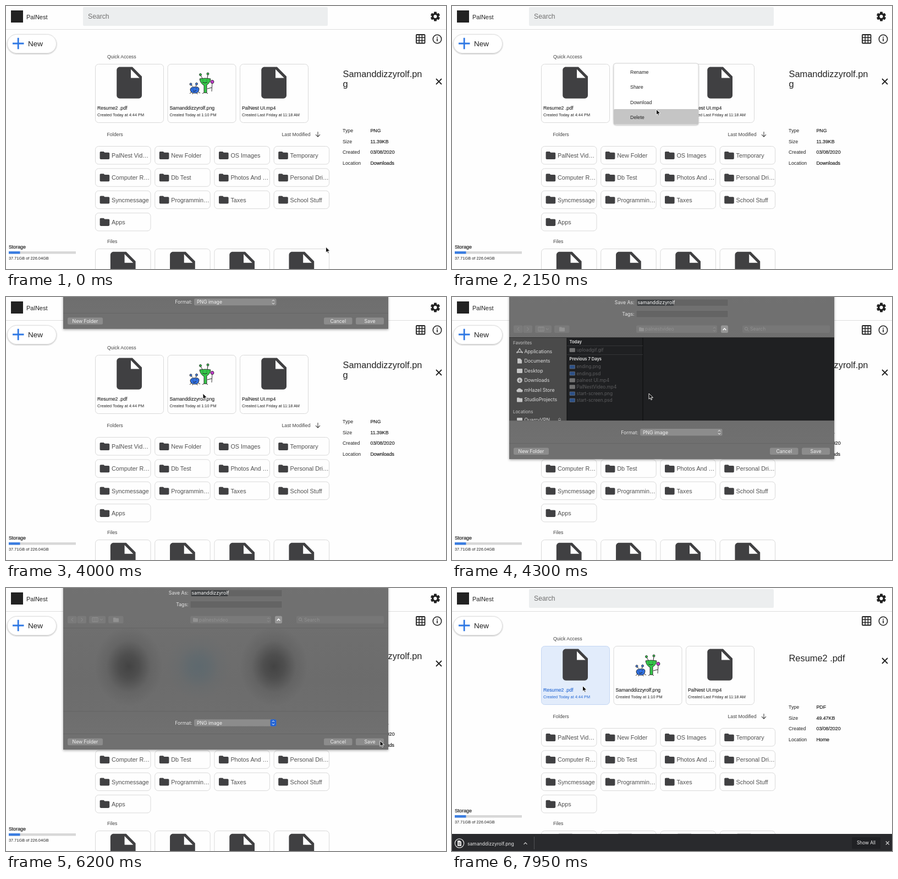
Recreate the animation shown at these times as an HTML page. Size 800 px wide and 477 px high, loop 8000 ms.

```html
<!DOCTYPE html>
<html lang="en">
<head>
<meta charset="utf-8">
<title>File drive</title>
<style>
html, body { margin: 0; width: 100%; height: 100%; overflow: hidden; background: #fefefe; }
svg { display: block; width: 800px; height: 477px; font-family: "Liberation Sans", Arial, sans-serif; }
text { white-space: pre; }
.mac { font-family: Inter, sans-serif; }
</style>
</head>
<body>
<svg id="stage" viewBox="0 0 800 477"></svg>
<script>
const LOOP = 8000;
const DOC = 'M6 2c-1.1 0-2 .9-2 2v16c0 1.1.9 2 2 2h12c1.1 0 2-.9 2-2V8l-6-6z';
const FOLDER = 'M10 4H4c-1.1 0-2 .9-2 2v12c0 1.1.9 2 2 2h16c1.1 0 2-.9 2-2V8c0-1.1-.9-2-2-2h-8z';

// y is the middle of the capitals; a null fill is inherited
const text = (x, y, s, size, fill = '#222', extra = '') =>
  `<text x="${x}" y="${y + size * .36}" font-size="${size}" ${fill ? `fill="${fill}"` : ''} ${extra}>${s}</text>`;
const rect = (x, y, w, h, fill, rx = 0, extra = '') =>
  `<rect x="${x}" y="${y}" width="${w}" height="${h}" rx="${rx}" fill="${fill}" ${extra}/>`;
const line = (d, color, width = 1, extra = '') =>
  `<path d="${d}" fill="none" stroke="${color}" stroke-width="${width}" ${extra}/>`;
const shape = (d, fill, extra = '') => `<path d="${d}" fill="${fill}" ${extra}/>`;
const circle = (x, y, r, fill, extra = '') => `<circle cx="${x}" cy="${y}" r="${r}" fill="${fill}" ${extra}/>`;
const group = (id, body, extra = '') => `<g id="${id}" ${extra}>${body}</g>`;
const at = (x, y, scale, body) => `<g transform="translate(${x} ${y}) scale(${scale})">${body}</g>`;
const medium = 'stroke="#222" stroke-width=".22"';

const outline = 'stroke="#d9d9d9"';
const docIcon = (x, y) => at(x - 11.4, y - 5.7, 2.86,
  shape(DOC, '#404042') + shape('M13 3.5V9h5.5z', '#fefefe'));
const folderIcon = (x, y, color = '#404042', scale = .88) => at(x - 2 * scale, y - 4 * scale, scale, shape(FOLDER, color));

function gear(x, y) {
  const teeth = Array.from({ length: 6 }, (_, i) =>
    `<rect x="-2.5" y="-8.6" width="5" height="6" rx=".8" transform="rotate(${i * 60})"/>`).join('');
  return at(x, y, 1, `<g fill="#222">${teeth}</g>` + circle(0, 0, 4.7, 'none', 'stroke="#222" stroke-width="3.4"') + circle(0, 0, 3, '#fefefe'));
}

function header() {
  return rect(9, 8, 22, 22, '#222') + text(37, 20, 'PalNest', 11, '#222') +
    rect(140, 2, 445, 34, '#eceeef', 2) + text(149, 19, 'Search', 12.2, '#707070') +
    gear(780.5, 19) + line('M0 42.5H800', '#dedede') +
    rect(2.5, 51.5, 89, 34, '#fff', 17, 'stroke="#dcdcdc" filter="url(#soft)"') +
    line('M12 68H32.5M22.2 57.8V78.2', '#2f78e4', 2.8) + text(40, 68, 'New', 13.5) +
    rect(746, 52, 15.5, 15.5, 'none', 1, 'stroke="#222" stroke-width="1.8"') +
    line('M751.2 52v15.5M756.4 52v15.5M746 57.2h15.5M746 62.4h15.5', '#222', 1.5) +
    circle(784, 60, 7.7, 'none', 'stroke="#222" stroke-width="1.6"') +
    line('M784 58.7V64M784 55.8V57.4', '#222', 1.7);
}

function doodle() {
  const ink = 'stroke="#222" stroke-width=".9" stroke-linejoin="round"';
  return line('M337 156l-3 3M340 158l-1 2M347 158l1 2M350 156l3 2M339 146l-2-3M345 146l1-3', '#222') +
    shape('M335 151q2-5 9-4 7-1 7 4-1 8-8 7-8 0-8-7z', '#2f6fe0', ink) +
    circle(336, 141.8, 2, '#4b86ee', ink) + circle(346.5, 141.3, 2, '#4b86ee', ink) +
    line('M340 150v1M346 149v1M340 154q3 2 6-1', '#222') +
    line('M357 131l-3-5M366 131l1-6M366 150l8-2M360 157l-3 2M364 157l3 2', '#222') +
    shape('M352 132q10-2 20 0-1 8-7 11l0 14q-3 1-5 0l0-13q-7-4-8-12z', '#35c64a', ink) +
    circle(353.5, 124.5, 2, '#35c64a', ink) + circle(367, 123, 2, '#35c64a', ink) +
    line('M358 134v1M365 134v1M357 138q5 3 9 0', '#222') +
    line('M375 138l-1 17', '#222', .9) + circle(375, 137.5, 3, '#c63bd0', ink);
}

function quickCard(i, name, date) {
  const x = 162.5 + i * 131.5;
  return rect(x, 105.5, 124, 106, '#fefefe', 6, i ? outline : `${outline} id="pick"`) +
    (i === 1 ? doodle() : docIcon(x + 38.7, 110.5)) +
    `<g ${i ? '' : 'id="pickText"'} fill="#222">` +
    text(x + 3.5, 184.5, name, 8.75, null, 'stroke="currentColor" stroke-width=".1"') +
    text(x + 3.5, 197.5, date, 7.33, null) + '</g>';
}

function content() {
  const names = ['PalNest Vid…', 'New Folder', 'OS Images', 'Temporary', 'Computer R…', 'Db Test', 'Photos And …',
    'Personal Dri…', 'Syncmessage', 'Programmin…', 'Taxes', 'School Stuff', 'Apps'];
  const column = c => 162.5 + c * 108.2;
  const folders = names.map((name, i) => {
    const x = column(i % 4), y = 254.5 + (i >> 2) * 40.3;
    return rect(x, y, 100.5, 32.5, '#fefefe', 6, outline) + folderIcon(x + 8.1, y + 9.4) + text(x + 29.5, y + 16.8, name, 10.8, '#505050');
  }).join('');
  const files = [0, 1, 2, 3].map(c =>
    rect(column(c), 440.5, 100.5, 106, '#fefefe', 6, outline) + docIcon(column(c) + 27.3, 445.8)).join('');
  return text(184, 92, 'Quick Access', 8.75, '#444') +
    quickCard(0, 'Resume2 .pdf', 'Created Today at 4:44 PM') +
    quickCard(1, 'Samanddizzyrolf.png', 'Created Today at 1:10 PM') +
    quickCard(2, 'PalNest UI.mp4', 'Created Last Friday at 11:18 AM') +
    text(183.5, 233, 'Folders', 8.75, '#444') + text(501.5, 233, 'Last Modified', 8.75, '#444') +
    line('M567 228v9M563 233.2l4 4 4-4', '#444', 1.1) + folders +
    text(184, 427, 'Files', 8.75, '#444') + files;
}

function details(title, values) {
  return title.map((s, i) => text(612.5, 132 + (i - (title.length - 1) / 2) * 18, s, 16.4)).join('') +
    `<g class="rows">${values.map((v, i) => text(662.5, 226.3 + i * 19.5, v, 8.8, '#222', medium)).join('')}</g>`;
}

function panel() {
  const labels = ['Type', 'Size', 'Created', 'Location'];
  return group('panel',
    group('infoImage', details(['Samanddizzyrolf.pn', 'g'], ['PNG', '11.39KB', '03/08/2020', 'Downloads'])) +
    group('infoPdf', details(['Resume2 .pdf'], ['PDF', '49.47KB', '03/08/2020', 'Home'])) +
    line('M782 132l10 10M792 132l-10 10', '#222', 1.8) +
    `<g class="rows">${labels.map((s, i) => text(612, 226.3 + i * 19.5, s, 8.8)).join('')}</g>`);
}

function storage() {
  return group('storage', text(5, 436.5, 'Storage', 8.8, '#222', medium) +
    rect(5, 445, 122, 4.5, '#d8d8d8') + rect(5, 445, 20.5, 4.5, '#3b7de0') +
    text(5, 457.5, '37.71GB of 226.04GB', 7.4));
}

const ROW = 27.5, MENU_TOP = 105;
function menu() {
  return group('menu', rect(294, 104, 154, 111, '#fff', 4, 'stroke="#d4d4d4" filter="url(#soft)"') +
    rect(294, 0, 154, ROW, '#c5c5c5', 2, 'id="hover"') +
    ['Rename', 'Share', 'Download', 'Delete'].map((s, i) => text(324, 119.5 + i * ROW, s, 8.9)).join(''));
}

function button(x, w, label) {
  return rect(x, 273.5, w, 12.5, '#8c8c8c', 2.5) + text(x + w / 2, 280, label, 8.7, '#f2f2f2', 'text-anchor="middle"');
}

function browser() {
  const places = ['Applications', 'Documents', 'Desktop', 'Downloads', 'mHazel Store', 'StudioProjects'];
  const icons = [
    line('M118 102l5-8.5 5 8.5M117 100h12', '#c4c4c4', 1.3),
    shape('M119 94h5l3 3v6h-8z', '#c4c4c4'),
    rect(118, 95, 10, 8, '#c4c4c4', 1),
    circle(123, 98.5, 4.8, '#c4c4c4') + line('M123 96v4.5M121 98.8l2 2 2-2', '#4b4b4b'),
    shape('M119 102.5a2.7 2.7 0 0 1 0-5 4 4 0 0 1 7 0 2.6 2.6 0 0 1 1 5z', '#c4c4c4'),
    folderIcon(118, 95, '#c4c4c4', .5)];
  const files = ['ending.png', 'ending.psd', 'palnest UI.mp4', 'PalNestVideo.mp4', 'start-screen.png', 'start-screen.psd'];
  const fileRow = (s, y, color) => rect(214, y - 3, 9.5, 6.5, color, .5, 'stroke="#8a8a8a" stroke-width=".5"') + text(226.5, y, s, 8.3, '#5d5d5f');
  const bold = 'font-weight="600"';
  return group('browser', rect(104, 73, 591, 151, '#1f2022') + rect(104, 73, 105, 151, '#4a4a4a') +
    line('M209 73v151M347 73v151', '#0c0c0d') + line('M104 73.5H695', '#333') +
    text(111, 83.5, 'Favorites', 7.8, '#b5b5b5', 'font-weight="500"') +
    places.map((s, i) => at(0, i * 17.5, 1, icons[i] + text(131.5, 98.5, s, 8.7, '#dedede'))).join('') +
    text(111, 208, 'Locations', 7.8, '#b5b5b5', 'font-weight="500"') +
    rect(118, 219, 10, 5, '#c4c4c4', 1) +
    `<g clip-path="url(#listClip)">${text(131.5, 222.5, 'QuarryVPN', 8.7, '#dedede')}</g>` +
    line('M193 222l2.5-2.5 2.5 2.5M193 223.5h5', '#aaa') +
    text(213.5, 81, 'Today', 7.6, '#e4e4e4', bold) + line('M209 88.5H347M209 104.5H347', '#343537') +
    fileRow('uploadgif.gif', 96, '#707070') + text(213.5, 112.5, 'Previous 7 Days', 7.6, '#e4e4e4', bold) +
    files.map((s, i) => fileRow(s, 126.5 + i * 12.1, /mp4$/.test(s) ? '#707070' : '#2d5187')).join(''));
}

function dialog() {
  const label = (x, y, s) => text(x, y, s, 8.7, '#e6e6e6', 'text-anchor="end"');
  const dim = '#929292';
  const tool = (x, w) => rect(x, 51.5, w, 13.5, '#7a7a7a', 2.5);
  const field = y => rect(335, y, 167, 12.5, '#646464', 0, 'stroke="#787878" stroke-width=".6"');
  const shade = (x, rx, ry, fill) => `<ellipse cx="${x}" cy="143" rx="${rx}" ry="${ry}" fill="url(#${fill})"/>`;
  return group('dialog', rect(104, -20, 591, 314, 'url(#sheet)', 0, 'filter="url(#drop)"') +
    shade(223, 62, 72, 'blurDark') + shade(487, 62, 72, 'blurDark') + shade(350, 58, 60, 'blurTint') +
    line('M104 73.5H695M104 224.5H695M104 265.5H695', '#656565') +
    label(331.5, 10, 'Save As:') + field(4) +
    rect(337, 4.8, 66, 11, '#3e4042') + text(337.5, 10, 'samanddizzyrolf', 8.7, '#fff') +
    label(331.5, 30.5, 'Tags:') + field(24.5) +
    tool(112, 16.5) + tool(129.5, 16.5) + tool(151, 30) + tool(186, 27.5) + tool(335, 147) +
    line('M122 55l-3 3.2 3 3.2M136.5 55l3 3.2-3 3.2M171 57l2.3 2.3 2.3-2.3', dim) +
    line('M157 54.5h10v7.5h-10zM160.3 54.5v7.5M163.7 54.5v7.5', dim) + folderIcon(195, 54.5, dim, .5) +
    folderIcon(340, 55, dim, .45) + text(351, 58.3, 'palnestvideo', 8.7, dim) +
    line('M475 57l2.2-2.2 2.2 2.2M475 60l2.2 2.2 2.2-2.2', dim) +
    rect(489, 51.5, 13, 13.5, '#969696', 2.5) + line('M492.7 60l2.8-3 2.8 3', '#fff', 1.5) +
    rect(528, 51.5, 159, 13.5, '#777', 2.5) + circle(535, 57.5, 2.6, 'none', `stroke="${dim}"`) +
    line('M537 59.5l2.3 2.3', dim) + text(542, 58.3, 'Search', 8.5, dim) +
    browser() +
    label(338.5, 245.5, 'Format:') + rect(342, 239, 149.5, 12.5, '#8c8c8c', 2.5) +
    rect(480.5, 239, 11, 12.5, '#2464d4', 2.5, 'id="focus"') + text(347, 245.5, 'PNG image', 8.7, '#f2f2f2') +
    line('M483.8 243.8l2.2-2.2 2.2 2.2M483.8 246.8l2.2 2.2 2.2-2.2', '#fff') +
    button(112, 64, 'New Folder') + button(578, 51.5, 'Cancel') + button(636, 51, 'Save'), 'class="mac"');
}

function badge() {
  return group('badge', circle(0, 0, 24, '#fff', 'stroke="#888" stroke-width=".8" filter="url(#drop)"') +
    shape('M-3-9h6v6h4.5L0 4.5-7.5-3H-3z', '#3f83ee') + line('M-10.5 15h21', '#3f83ee', 2.4));
}

function shelf() {
  return group('shelf', rect(0, 446, 800, 32, '#292a2d') +
    circle(13.5, 463, 8.2, 'none', 'stroke="#e4e4e4" stroke-width="1.2"') +
    shape('M10 458h4.5l2.5 2.5v7.5h-7z', '#e4e4e4') + line('M11.3 462.5h4.4M11.3 465h4.4', '#292a2d', .8) +
    text(28, 463.5, 'samanddizzyrolf.png', 8.6, '#e8e8e8') + line('M130.5 464.8l3-3 3 3', '#ddd', 1.1) +
    line('M149.5 451v23', '#505154') + rect(727, 452, 52, 21, '#202124', 2) +
    text(753, 462.5, 'Show All', 8.3, '#eee', 'text-anchor="middle"') +
    line('M788.8 459.5l6 6M794.8 459.5l-6 6', '#ccc', 1.2), 'class="mac"');
}

const glow = (id, color, alpha) => `<radialGradient id="${id}"><stop stop-color="${color}" stop-opacity="${alpha}"/>
  <stop offset=".3" stop-color="${color}" stop-opacity="${alpha * .74}"/><stop offset=".65" stop-color="${color}" stop-opacity="${alpha * .2}"/>
  <stop offset="1" stop-color="${color}" stop-opacity="0"/></radialGradient>`;
const stage = document.getElementById('stage');
stage.innerHTML = `<defs>
  <filter id="soft" x="-10%" y="-20%" width="120%" height="150%"><feDropShadow dx="0" dy="1" stdDeviation="1.2" flood-opacity=".28"/></filter>
  <filter id="drop" x="-30%" y="-30%" width="160%" height="160%"><feDropShadow dx="0" dy="1.5" stdDeviation="2" flood-opacity=".35"/></filter>
  <clipPath id="listClip"><rect x="104" y="73" width="591" height="151"/></clipPath>
  <linearGradient id="sheet" x2="0" y2="1"><stop stop-color="#717171"/><stop offset=".6" stop-color="#6c6c6c"/><stop offset="1" stop-color="#707070"/></linearGradient>
  ${glow('blurDark', '#333', .72)}${glow('blurTint', '#4c6470', .45)}</defs>` +
  rect(0, 0, 800, 477, '#fefefe') + header() + content() + panel() + storage() + menu() + dialog() + badge() + shelf() +
  group('cursor', shape('M0 0V10.2L2.4 8 4 11.7 5.7 11 4.1 7.4H7.5Z', '#111', 'stroke="#fff" stroke-width=".9"'));

const part = Object.fromEntries([...stage.querySelectorAll('[id]')].map(e => [e.id, e]));
const rows = stage.querySelectorAll('.rows');

// time, x, y
const PATH = [[0, 582, 437], [50, 560, 437], [100, 536, 435], [200, 536, 435], [600, 438, 290], [1050, 364, 155],
  [1250, 352, 150], [1450, 352, 150], [2000, 368, 198], [2150, 371.5, 187.5], [2250, 371, 185], [2400, 371, 185],
  [3150, 358, 175], [4600, 358, 175], [5350, 705, 282], [5500, 700, 281], [6050, 680, 277], [6300, 680, 277],
  [6800, 472.5, 239.5], [7150, 330, 205], [7500, 240, 178], [7950, 237.5, 177.5]];

const clamp = v => Math.max(0, Math.min(1, v));
const ease = (t, from, to) => { const v = clamp((t - from) / (to - from)); return v * v * (3 - 2 * v); };
const show = (el, on) => el.setAttribute('visibility', on ? 'inherit' : 'hidden');
const move = (el, x, y) => el.setAttribute('transform', `translate(${x} ${y})`);

function pointer(t) {
  const next = PATH.findIndex(p => p[0] > t);
  if (next < 0) return PATH[PATH.length - 1].slice(1);
  const a = PATH[next - 1], b = PATH[next], k = (t - a[0]) / (b[0] - a[0]);
  return [a[1] + (b[1] - a[1]) * k, a[2] + (b[2] - a[2]) * k];
}

function render(t) {
  const [x, y] = pointer(t);
  move(part.cursor, x, y);

  show(part.menu, t >= 1450 && t < 3450);
  const row = Math.max(0, Math.min(3, Math.floor((y - MENU_TOP + .4) / ROW)));
  part.hover.setAttribute('y', MENU_TOP + ROW * row - .5);

  const down = ease(t, 3885, 4275) - ease(t, 6190, 6550);
  move(part.dialog, 0, 300 * (down - 1));
  show(part.dialog, down > 0);
  show(part.browser, t >= 4275 && t < 6190);
  show(part.focus, t >= 4400);

  const drop = (t - 6680) / 600;
  show(part.badge, drop >= 0 && drop <= 1);
  move(part.badge, 18.5, 405.5 + 48 * clamp(drop));
  part.badge.setAttribute('opacity', Math.max(.3, Math.sin(Math.PI * clamp(drop))));

  const open = ease(t, 6970, 7120);
  move(part.shelf, 0, 32 * (1 - open));
  show(part.shelf, open > 0);
  move(part.storage, 0, -33 * open);
  move(part.panel, 0, -5 * open);
  rows.forEach(r => move(r, 0, -5 * open));

  const picked = t >= 7600;
  show(part.infoImage, !picked);
  show(part.infoPdf, picked);
  part.pick.setAttribute('fill', picked ? '#e2ecfb' : '#fefefe');
  part.pick.setAttribute('stroke', picked ? '#c3d6f3' : '#d9d9d9');
  part.pickText.setAttribute('fill', picked ? '#2266d3' : '#222');
  part.pickText.setAttribute('color', picked ? '#2266d3' : '#222');
}

const start = performance.now();
(function tick() {
  render((performance.now() - start) % LOOP);
  requestAnimationFrame(tick);
})();
</script>
</body>
</html>
```
